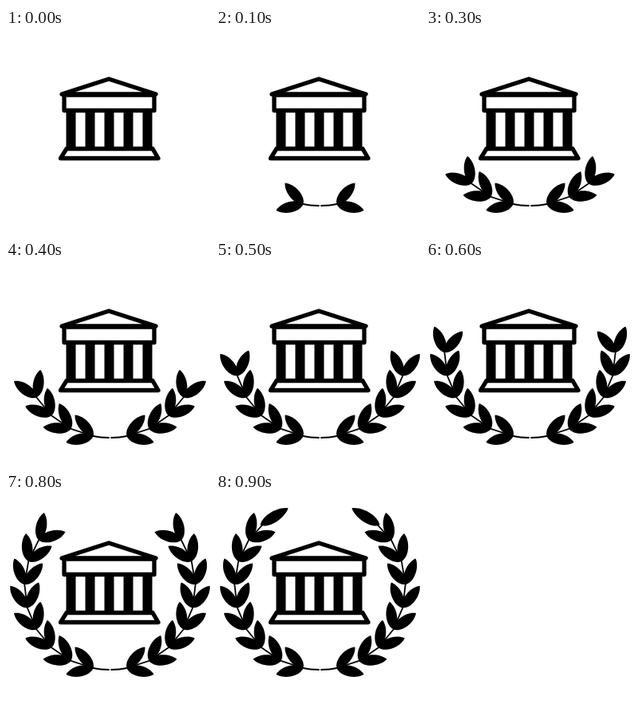
An HTML page with a canvas for the animation above (1.2 s loop, 256 by 256 pixels).

```html
<!DOCTYPE html>
<html lang="en">
<head>
<meta charset="utf-8">
<title>Temple and laurel</title>
<style>
html, body { margin: 0; width: 100%; height: 100%; overflow: hidden; background: #fff; }
canvas { display: block; width: 256px; height: 256px; }
</style>
</head>
<body>
<canvas id="stage" width="256" height="256"></canvas>
<script>
const ctx = document.getElementById('stage').getContext('2d');
const LOOP = 1200, BEAT = 100, AXIS = 130.5;
const RAD = Math.PI / 180;

// The branch grows like a turtle walk: a pair of leaves, a step, a turn
const ROOT = { x: 109.5, y: 221, heading: 162 };
const STRIDE = 29.5, TURN = 16.3, SPREAD = 31;
const LEAF = 35, PAIRS = 8;

function outline(...points) {
  ctx.beginPath();
  points.forEach(([x, y]) => ctx.lineTo(x, y));
  ctx.closePath();
  ctx.stroke();
}

function temple() {
  ctx.lineWidth = 5.3;
  outline([70, 83], [129, 64], [188, 83]);
  outline([73, 84], [73, 103.5], [186, 103.5], [186, 84]);
  outline([76, 151.5], [184, 151.5], [191, 163.5], [68.5, 163.5]);
  for (let i = 0; i < 5; i++) ctx.fillRect(75.5 + i * 24, 104, 12, 47);
}

function leaf({ x, y }, angle, from = 0) {
  const len = LEAF - from, near = from + len * 0.17, far = from + len * 0.74, bulge = 9;
  ctx.save();
  ctx.translate(x, y);
  ctx.rotate(-angle * RAD);
  ctx.beginPath();
  ctx.moveTo(from, 0);
  ctx.bezierCurveTo(near, bulge, far, bulge, LEAF, 0);
  ctx.bezierCurveTo(far, -bulge, near, -bulge, from, 0);
  ctx.fill();
  ctx.restore();
}

function branch(count) {
  const tip = { ...ROOT };
  const stem = new Path2D();
  stem.moveTo(129, 223);
  stem.quadraticCurveTo(118, 223, tip.x, tip.y);
  for (let i = 0; i < count; i++) {
    if (i > 0) {
      tip.x += STRIDE * Math.cos(tip.heading * RAD);
      tip.y -= STRIDE * Math.sin(tip.heading * RAD);
      tip.heading -= TURN;
      stem.lineTo(tip.x, tip.y);
    }
    if (i < PAIRS) {
      leaf(tip, tip.heading + SPREAD);
      leaf(tip, tip.heading - SPREAD);
    } else {
      leaf(tip, tip.heading, -6);
    }
  }
  ctx.lineWidth = 1.8;
  ctx.stroke(stem);
}

function draw(time) {
  const count = Math.min(PAIRS + 1, Math.floor(time % LOOP / BEAT));
  ctx.fillStyle = '#fff';
  ctx.fillRect(0, 0, 256, 256);
  ctx.fillStyle = ctx.strokeStyle = '#000';
  ctx.lineJoin = ctx.lineCap = 'round';
  temple();
  if (!count) return;
  branch(count);
  ctx.save();
  ctx.translate(2 * AXIS, 0);
  ctx.scale(-1, 1);
  branch(count);
  ctx.restore();
}

const start = performance.now();
function tick() {
  draw(performance.now() - start);
  requestAnimationFrame(tick);
}
tick();
</script>
</body>
</html>
```
